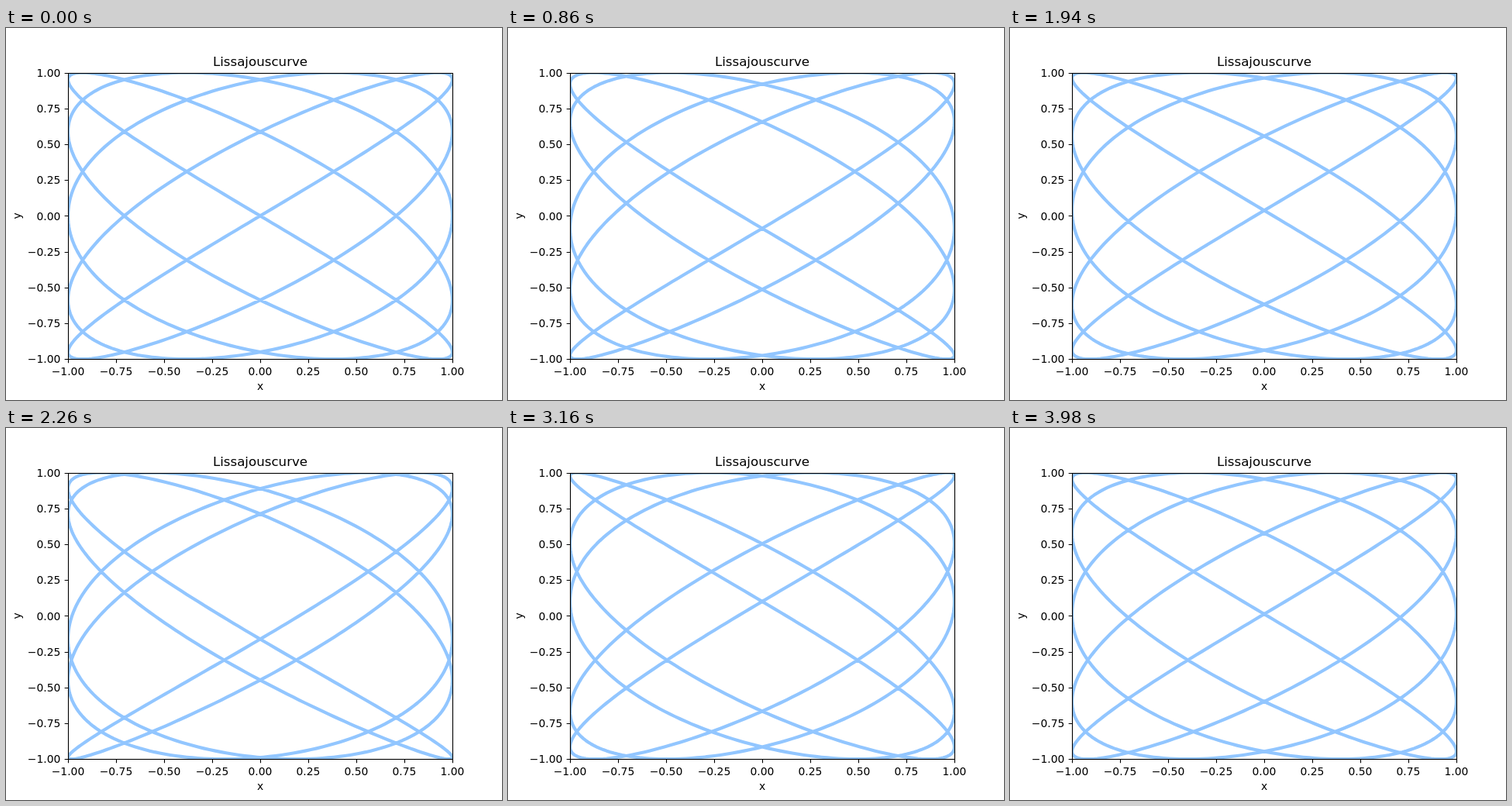
Animation, 640 px wide and 480 px high, one loop 4000 ms. Source, as an HTML page:

```html
<!DOCTYPE html>
<html lang="en">
<head>
<meta charset="utf-8">
<title>Lissajous curve</title>
<style>
html, body { margin: 0; width: 100%; height: 100%; overflow: hidden; background: #fff; }
svg { display: block; width: 640px; height: 480px; }
text { font: 13.889px "DejaVu Sans", sans-serif; text-anchor: middle; }
.title { font-size: 16.667px; }
.right { text-anchor: end; }
.axes { fill: none; stroke: #000; stroke-width: 1.11; }
#curve { fill: none; stroke: #92c6ff; stroke-width: 4.167; stroke-linejoin: round; }
</style>
</head>
<body>
<svg viewBox="0 0 640 480">
  <clipPath id="plot"><rect x="80" y="58" width="496.5" height="369.5"/></clipPath>
  <g clip-path="url(#plot)"><path id="curve"/></g>
  <rect class="axes" x="80.5" y="58.5" width="496" height="369"/>
  <path class="axes" id="ticks"/>
  <g id="labels"></g>
  <text class="title" x="328" y="49">Lissajouscurve</text>
  <text x="328" y="467">x</text>
  <text transform="translate(19 242.4) rotate(-90)">y</text>
</svg>
<script>
const el = id => document.getElementById(id);
const px = x => 328 + 248 * x;
const py = y => 242.4 - 184.8 * y;
const snap = v => Math.floor(v + 0.5) + 0.5;

let ticks = '', labels = '';
for (let i = -4; i <= 4; i++) {
  const v = i / 4, x = px(v), y = py(v);
  const name = v.toFixed(2).replace('-', '\u2212');
  ticks += `M${snap(x)} 427.5v4.86M80.5 ${snap(y)}h-4.86`;
  labels += `<text x="${x}" y="448">${name}</text>` +
    `<text class="right" x="70.3" y="${Math.round(y + 5.2)}">${name}</text>`;
}
el('ticks').setAttribute('d', ticks);
el('labels').innerHTML = labels;

const POINTS = 1000, STEP = 20, STEPS = 200;

function draw() {
  const step = Math.floor(performance.now() / STEP) % STEPS;
  const phase = Math.PI * step / STEPS;
  let d = '';
  for (let i = 0; i < POINTS; i++) {
    const t = 2 * Math.PI * i / POINTS;
    const x = px(Math.sin(5 * t + phase)), y = py(Math.sin(4 * t));
    d += (i ? 'L' : 'M') + x.toFixed(2) + ' ' + y.toFixed(2);
  }
  el('curve').setAttribute('d', d + 'Z');
  requestAnimationFrame(draw);
}
draw();
</script>
</body>
</html>
```
